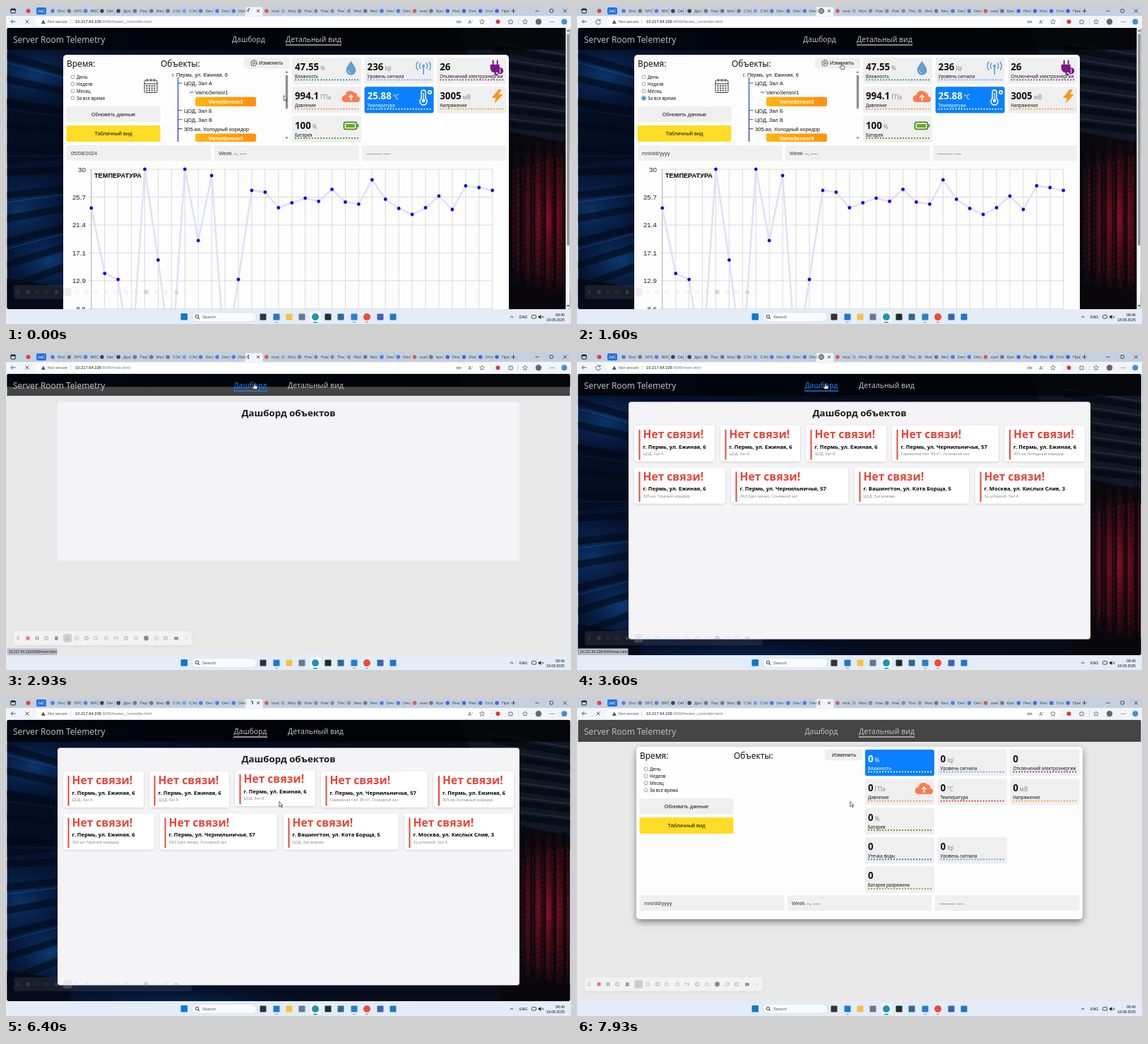
These frames come from a looping animation (800x450 px, 8000 ms). An HTML page:

```html
<!DOCTYPE html>
<html lang="ru">
<head>
<meta charset="utf-8">
<title>Server Room Telemetry</title>
<style>
html, body { margin: 0; width: 100%; height: 100%; overflow: hidden; background: #e3ecf7; }
svg { display: block; width: 100vw; height: 100vh; }
text { font-family: "Liberation Sans", Arial, sans-serif; white-space: pre; }
.n { font-family: "Noto Sans", sans-serif; }
.b { font-weight: 700; }
.mid { text-anchor: middle; }
.end { text-anchor: end; }
</style>
</head>
<body>
<svg id="stage" viewBox="0 0 800 450" xmlns="http://www.w3.org/2000/svg"></svg>
<script>
const LOOP = 8000;
const HOST = '10.217.64.226';

const text = (x, y, str, size, cls = '', fill = '#111', id = '') =>
  `<text x="${x}" y="${y}" font-size="${size}" class="${cls}" fill="${fill}" ${id && `id="${id}"`}>${str}</text>`;
const rect = (x, y, w, h, fill, r = 0, extra = '') =>
  `<rect x="${x}" y="${y}" width="${w}" height="${h}" fill="${fill}" rx="${r}" ${extra}/>`;
const disc = (x, y, r, fill, extra = '') => `<circle cx="${x}" cy="${y}" r="${r}" fill="${fill}" ${extra}/>`;
const line = (d, stroke, width = 1, extra = '') =>
  `<path d="${d}" fill="none" stroke="${stroke}" stroke-width="${width}" ${extra}/>`;
const shape = (d, fill) => `<path d="${d}" fill="${fill}"/>`;
const glow = (x, y, rx, ry, color, opacity = 1) =>
  `<ellipse cx="${x}" cy="${y}" rx="${rx}" ry="${ry}" fill="url(#${color})" opacity="${opacity}"/>`;
const group = (id, body, extra = '') => `<g id="${id}" ${extra}>${body}</g>`;
const range = (n, fn) => Array.from({ length: n }, (_, i) => fn(i)).join('');

const defs = `<defs>
  <linearGradient id="room"><stop stop-color="#051431"/><stop offset=".4" stop-color="#040c20"/>
    <stop offset=".85" stop-color="#080c17"/><stop offset="1" stop-color="#10070c"/></linearGradient>
  <radialGradient id="blueGlow"><stop stop-color="#1259a8" stop-opacity=".8"/><stop offset="1" stop-color="#0a3c86" stop-opacity="0"/></radialGradient>
  <radialGradient id="redGlow"><stop stop-color="#981226" stop-opacity=".8"/><stop offset="1" stop-color="#600a1c" stop-opacity="0"/></radialGradient>
  <linearGradient id="orange"><stop stop-color="#ffb412"/><stop offset="1" stop-color="#ff8f0c"/></linearGradient>
  <linearGradient id="tree" x2="0" y2="1"><stop stop-color="#3a6fe0"/><stop offset="1" stop-color="#6a35a8"/></linearGradient>
  <filter id="cardShadow" x="-10%" y="-20%" width="120%" height="150%"><feDropShadow dx="0" dy="1" stdDeviation="1.5" flood-opacity=".16"/></filter>
  <filter id="panelShadow" x="-5%" y="-10%" width="110%" height="125%"><feDropShadow dx="0" dy="4" stdDeviation="5" flood-opacity=".45"/></filter>
  <clipPath id="page"><rect x="1.5" y="30.5" width="797" height="398.5" rx="3"/></clipPath>
  <clipPath id="loaded"><rect id="reveal" x="0" y="30" width="800" height="400"/></clipPath>
</defs>`;

// Server room backdrop: dim blue racks on the left, red cabinets on the right
const photo = rect(0, 30, 800, 400, 'url(#room)')
  + glow(40, 98, 75, 42, 'blueGlow', .6) + glow(20, 290, 80, 60, 'blueGlow', .55)
  + glow(62, 360, 65, 45, 'blueGlow', .7) + glow(250, 438, 190, 32, 'blueGlow', .5)
  + range(11, i => line(`M0 ${70 + i * 33} L90 ${96 + i * 27}`, '#030916', 10, 'opacity=".6"'))
  + range(5, i => line(`M0 ${80 + i * 66} L90 ${104 + i * 54}`, '#2a74bd', .8, 'opacity=".55"'))
  + shape('M0 130 L90 150 V215 L0 225Z', '#030a1a99')
  + shape('M0 385 L90 400 V430 H0Z', '#040a18')
  + shape('M640 30 H800 V195 L700 175Z', '#101725')
  + range(6, i => line(`M690 ${52 + i * 21} L800 ${70 + i * 20}`, '#3d485c', 1.2, 'opacity=".6"')
    + line(`M690 ${60 + i * 21} L800 ${78 + i * 20}`, '#05080f', 9, 'opacity=".7"'))
  + shape('M705 178 L800 195 V215 L705 205Z', '#07090f')
  + glow(768, 300, 62, 120, 'redGlow')
  + range(6, i => line(`M${716 + i * 15} 190V430`, '#0b060b', 7, 'opacity=".8"'))
  + range(12, i => line(`M${718 + i * 7} ${232 - i * 2}V${372 + i * 2}`, '#c4263c', .7, 'opacity=".55" stroke-dasharray="5 2"'))
  + shape('M700 390 L800 405 V430 H700Z', '#0a070c');

const icons = {
  drop: shape('M0-9C3-4 7 0 7 4A7 7 0 0 1-7 4C-7 0-3-4 0-9Z', '#62a0ca') + line('M-4 4A4 4 0 0 0 0 8', '#b9d9ee'),
  signal: line('M0 10V-2M-4-6A6 6 0 0 0-4 2M4-6A6 6 0 0 1 4 2M-8-8A10 10 0 0 0-8 4M8-8A10 10 0 0 1 8 4', '#5b9ce0', 1.7) + disc(0, -2, 2, '#5b9ce0'),
  plug: shape('M-8-4H5V1A6 6 0 0 1-8 1Z', '#7b1685') + line('M-4-10V-4M2-10V-4M-1 6V10H3', '#7b1685', 2) + disc(6, 5, 4.5, '#7b1685') + line('M6 2V8', '#fff', 1),
  cloud: shape('M-8 8A5 5 0 0 1-8-2A7 7 0 0 1 4-6A6 6 0 0 1 9 0A4 4 0 0 1 8 8Z', '#fa7d50') + line('M0 6V-2M-3 1L0-2L3 1', '#fff', 1.7),
  thermo: line('M-3-6A3 3 0 0 1 3-6V3A5 5 0 1 1-3 3Z', '#fff', 1.5) + disc(0, 6, 2.4, '#fff') + line('M0 5V-5', '#fff', 1.3) + disc(9, -6, 2.2, 'none', 'stroke="#fff" stroke-width="1.7"'),
  bolt: shape('M4-10L-6 2H0L-2 10L10-3H4L8-10Z', '#ff9416'),
  battery: rect(-10, -5, 18, 10, 'none', 2.5, 'stroke="#4a8c14" stroke-width="1.8"') + rect(-7.5, -2.5, 13, 5, '#6aac22', 1) + rect(9, -2, 2, 4, '#4a8c14')
};

function tile(col, row, value, unit, label, color, icon = '', active = false) {
  const x = 405 + col * 102.6, y = 73 + row * 41.3, ink = active ? '#fff' : '#111';
  return rect(x, y, 98, 37.3, active ? '#0a80ff' : '#efeff0', 3)
    + `<text x="${x + 4}" y="${y + 18}" font-size="13.3" class="n b" fill="${ink}">${value}<tspan dx="2" font-size="8.2" font-weight="400" fill="${active ? '#fff' : '#888'}">${unit}</tspan></text>`
    + text(x + 4, y + 29, label, 6.2, 'n', ink)
    + line(`M${x + 5} ${y + 31.5}H${x + 94}`, active ? '#fff' : color, 2.1, 'stroke-dasharray="0 4" stroke-linecap="round"')
    + (icon && `<g transform="translate(${x + 83.5} ${y + 13.8})">${icons[icon]}</g>`);
}

const fullTiles = () =>
  tile(0, 0, '47.55', '%', 'Влажность', '#1b8296', 'drop')
  + tile(1, 0, '236', 'lqi', 'Уровень сигнала', '#6a9cf0', 'signal')
  + tile(2, 0, '26', '', 'Отключений электроэнергии', '#8b1a95', 'plug')
  + tile(0, 1, '994.1', 'ГПа', 'Давление', '#fa8a62', 'cloud')
  + tile(1, 1, '25.88', '°C', 'Температура', '#d62a1e', 'thermo', true)
  + tile(2, 1, '3005', 'мВ', 'Напряжение', '#f5a020', 'bolt')
  + tile(0, 2, '100', '%', 'Батарея', '#4a8c14', 'battery');

const emptyTiles = () =>
  tile(0, 0, '0', '%', 'Влажность', '#1b8296', '', true)
  + tile(1, 0, '0', 'lqi', 'Уровень сигнала', '#6a9cf0')
  + tile(2, 0, '0', '', 'Отключений электроэнергии', '#8b1a95')
  + tile(0, 1, '0', 'ГПа', 'Давление', '#fa8a62', 'cloud')
  + tile(1, 1, '0', '°C', 'Температура', '#d62a1e')
  + tile(2, 1, '0', 'мВ', 'Напряжение', '#f5a020')
  + tile(0, 2, '0', '%', 'Батарея', '#4a8c14')
  + tile(0, 3, '0', '', 'Утечка воды', '#2381b8')
  + tile(1, 3, '0', 'lqi', 'Уровень сигнала', '#6a9cf0')
  + tile(0, 4, '0', '', 'Батарея разряжена', '#8c9a14');

const dateRow = (y, id) => range(3, i =>
  rect(86 + i * 209, y, 204.5, 22, '#f0f0f1', 2)
  + text(92 + i * 209, y + 13.5, ['mm/dd/yyyy', 'Week --, ----', '--------- ----'][i], 7.4, '', '#333', i ? '' : id));

const controls = id =>
  text(86, 86, 'Время:', 11.9, 'n') + text(219, 86, 'Объекты:', 11.9, 'n')
  + ['День', 'Неделя', 'Месяц', 'За все время'].map((s, i) =>
      disc(94.5, 100.3 + i * 10, 2.5, '#fff', 'stroke="#777" stroke-width=".7"') + text(100, 102.7 + i * 10, s, 6.3, 'n')).join('')
  + group(id, disc(94.5, 130.3, 2.7, '#fff', 'stroke="#0a6fe0"') + disc(94.5, 130.3, 1.5, '#0a6fe0'), 'visibility="hidden"')
  + rect(85.5, 142, 133, 22.5, '#efeff0', 2) + text(152, 155.8, 'Обновить данные', 7.5, 'mid')
  + rect(85.5, 169, 133, 23, '#ffdc26', 2) + text(152, 183, 'Табличный вид', 7.5, 'mid');

function objectTree() {
  const rows = [[252, 'ЦОД, Зал А', 112], [268, 'VarnoSensor1', 125], [252, 'ЦОД, Зал Б', 150.5], [252, 'ЦОД, Зал В', 163.5], [252, '305-ая, Холодный коридор', 176.5]];
  return text(235, 99.5, 'г. Пермь, ул. Ежиная, 6', 7.4)
    + rect(242.8, 101, 1.5, 91, 'url(#tree)')
    + rows.map(([x, s, y]) => text(x, y, s, 7.4) + line(`M${x - 8} ${y - 2.8}h5.5`, y > 170 ? '#6a40b8' : '#3a80e0', 1.3)).join('')
    + [[128.7, 13.3, 2], [180.6, 11.4, 9]].map(([y, h, n]) =>
        rect(268, y, 86, h, 'url(#orange)', 2.5) + text(311, y + 9.2, 'VarnoSensor' + n, 7.3, 'b mid', '#fff')).join('')
    + rect(395.8, 97.5, 3.4, 48, '#909090', 1.7) + shape('M395.5 94.5l2-2.5 2 2.5z', '#666') + shape('M395.5 185.5l2 2.5 2-2.5z', '#666');
}

function chart() {
  // Temperatures as heights on the page; 507 is the zero line below the fold
  const ys = [286, 378.5, 387, 507, 231, 359.5, 507, 231, 332, 240, 507, 387, 261, 263.5, 285.5, 278.5, 272, 276.5, 259.5, 277.5, 280.5,
    246, 273.5, 286.5, 295, 285.5, 269, 288, 254.5, 257, 261];
  const px = i => 120.8 + i * 18.93;
  return range(31, i => line(`M${px(i)} 231V430`, '#d2d2d4', .8))
    + ['30', '25.7', '21.4', '17.1', '12.9', '8.6'].map((s, i) =>
        line(`M117 ${231 + i * 39.45}H689`, '#d2d2d4', .8) + text(113, 234.5 + i * 39.45, s, 9.8, 'end', '#222')).join('')
    + line('M120.8 231V430', '#aaa', .8)
    + line('M' + ys.map((y, i) => px(i) + ' ' + y).join('L'), '#e0e0f6', 2.5)
    + ys.map((y, i) => disc(px(i), y, 2.4, '#0808e8')).join('')
    + text(125, 243, 'ТЕМПЕРАТУРА', 9.2, 'b', '#000');
}

const NAV = [190, 190, 190], LINK = [26, 136, 255];
const navColor = `rgb(${NAV})`;
const header = shift => rect(0, 30, 800, 32, '#000', 0, 'opacity=".7"')
  + text(10, 51.5, 'Server Room Telemetry', 11.9, 'n', navColor)
  + text(396 + shift, 50.5, 'Детальный вид', 10.4, 'n', navColor);
const homeLink = (x, id) => text(x, 50.5, 'Дашборд', 10.3, 'n', navColor, id);

const fullDetail = header(0) + homeLink(320, 'linkA') + rect(320, 54.5, 47, 1.2, '#1a88ff', 0, 'id="underA"')
  + rect(396, 54.5, 79, 1.2, '#d8d8d8')
  + rect(81, 69, 631, 370, '#fdfdfd', 5) + controls('allTime')
  + rect(196, 105, 18, 17.5, 'none', 2, 'stroke="#333" stroke-width="1"') + line('M196 110H214M200 103V107M205 103V107M210 103V107', '#333', 1)
  + range(12, i => rect(198.5 + i % 4 * 3.6, 112 + Math.floor(i / 4) * 3.3, 2, 2, '#444'))
  + rect(337, 73, 64, 15.5, '#efeff0', 3) + disc(351, 80.8, 4, 'none', 'stroke="#333" stroke-width="1.1" stroke-dasharray="2.2 .7"') + disc(351, 80.8, 1.5, 'none', 'stroke="#333" stroke-width=".8"')
  + text(358, 83.3, 'Изменить', 7.6)
  + objectTree() + fullTiles() + dateRow(197, 'dateField') + chart()
  + rect(792.5, 30, 7, 400, '#f4f4f5') + rect(794.4, 39, 3, 300, '#8b8b8d', 1.5) + shape('M793.8 36l2.1-3 2.1 3z', '#555') + shape('M793.8 423l2.1 3 2.1-3z', '#555');

const emptyDetail = header(3) + homeLink(322.5, 'linkC') + rect(399, 54.5, 79, 1.2, '#e2e2e2')
  + rect(84, 69, 632, 244, '#fdfdfd', 5, 'filter="url(#panelShadow)"')
  + '<g transform="translate(3 0)">' + controls('allTimeOff')
  + rect(348, 73, 53, 15.5, '#efeff0', 3) + text(358, 83.3, 'Изменить', 7.6)
  + emptyTiles() + dateRow(279, '') + '</g>';

const PERM = 'г. Пермь, ул. Ежиная, 6', PLANT = 'г. Пермь, ул. Чернильничья, 57';
const cards = [
  [81, 104, 114, PERM, 'ЦОД, Зал А'], [203, 104, 113, PERM, 'ЦОД, Зал Б'], [324, 104, 114, PERM, 'ЦОД, Зал В'],
  [446, 104, 151, PLANT, 'Серверная тип. 85-01, Основной зал'], [605.5, 104, 113.5, PERM, '305-ая, Холодный коридор'],
  [81, 163.5, 129, PERM, '305-ая, Горячий коридор'], [218, 163.5, 166, PLANT, 'ЛАЗ (Цех связи), Основной зал'],
  [393, 163.5, 162, 'г. Вашингтон, ул. Кота Борща, 5', 'ЦОД, Зал вовово'], [564, 163.5, 155, 'г. Москва, ул. Кислых Слив, 3', 'За шторкой, Зал А']
].map(([x, y, w, address, place], i) => group('card' + i,
  rect(x, y, w, 51, '#fff', 4, 'filter="url(#cardShadow)"') + rect(x + 6.5, y + 6, 2, 42.5, '#e8483c')
  + text(x + 12.5, y + 18, 'Нет связи!', 15.6, 'n b', '#ea4335')
  + text(x + 12.5, y + 32.5, address, 7.55, 'n b', '#000') + text(x + 12.5, y + 42, place, 5.45, 'n', '#888'))).join('');

const dashboard = header(3) + homeLink(322.5, 'linkB') + rect(322, 54.5, 48, 1.3, '#ddd', 0, 'id="underB"')
  + rect(73, 70.5, 654, 336, '#f4f3f6', 4, 'id="board"')
  + text(400, 91.3, 'Дашборд объектов', 13.2, 'n b mid', '#1b1b1b') + group('cards', cards);

const recorder = rect(11, 395, 252, 20, '#fff', 4, 'id="recorderBar" filter="url(#cardShadow)"')
  + group('recorderIcons', rect(81, 399, 12, 12, '#ccc', 2) + rect(28.5, 402.5, 5, 5, '#e86060')
    + line('M42.5 402.5v5M45.5 402.5v5', '#777', 1.4) + rect(69, 402.5, 4.5, 5.5, '#888', 1)
    + [57, 87, 100, 114, 127, 142, 170, 184, 213, 226].map((x, i) => disc(x, 405, 2.4, 'none', `stroke="${i % 3 ? '#aaa' : '#888'}" stroke-width=".9"`)).join('')
    + text(152, 407.5, 'Tт', 6.5, '', '#888') + disc(198.5, 405, 3.4, '#777') + rect(238, 403, 6, 4.5, '#888', 1)
    + line('M256.5 403l-2 2 2 2M16 402v6M18 402v6', '#aaa', .8));

const tabNames = 'Sho SPC BRC Del Дро Пер Мес СЭл СЭл Dev Dev Dev . mos Mos Нов Нов The Mos Nev Dev Dev user Кри Реа Res Отл При'.split(' ');
const tabColors = '#5a7bd8 #777 #5a7bd8 #444 #444 #777 #777 #777 #7aa0d8 #5578e8 #5578e8 #5578e8 . #d85a4a #aaa #88a #88a #88a #999 #777 #5578e8 #5578e8 #d85a4a #777 #4466e8 #4466e8 #4466e8 #4466e8'.split(' ');
const globe = disc(346, 7, 3.5, 'none', 'stroke="#333" stroke-width=".9"') + line('M342.5 7h7M346 3.5v7M346 3.5a4 4 0 0 0 0 7a4 4 0 0 0 0-7', '#333', .6);

const browser = rect(0, 0, 800, 15, '#c5d0de') + rect(0, 14, 800, 17, '#f1f4f9')
  + rect(6.8, 4, 6.5, 6, 'none', 1, 'stroke="#222" stroke-width="1"') + rect(6.8, 4, 6.5, 2, '#222') + disc(31.5, 7, 3, '#e04038')
  + rect(43, 2, 14, 10, '#2670e0', 2) + text(50, 9.2, 'JaC', 5.8, 'mid', '#fff')
  + shape('M336 15Q338.5 15 338.5 12V4Q338.5 1.5 341 1.5H361Q363.5 1.5 363.5 4V12Q363.5 15 366 15Z', '#f1f4f9')
  + tabNames.map((s, i) => {
      const x = 66 + i * 23.3;
      return i === 12 ? '' : disc(x, 7, 2.8, tabColors[i]) + text(x + 6.8, 9.2, s, 5.7, '', '#444') + rect(x + 17.5, 3.5, .6, 7, '#9aa5b3');
    }).join('')
  + line('M355 5l4 4M359 5l-4 4M718.5 4v6M715.5 7h6M749.5 7h5M789 4.5l5 5M794 4.5l-5 5', '#222', .8)
  + rect(770, 4.5, 4.5, 4.5, 'none', 1, 'stroke="#222" stroke-width=".8"')
  + line('M13.5 22H7M9.5 19.5L7 22l2.5 2.5', '#444', .9)
  + rect(42, 16, 643, 12.8, '#fff', 6.4)
  + shape('M49.8 25l3-5.5 3 5.5z', '#555') + text(59, 24.4, 'Not secure', 5.8, '', '#555') + rect(91.5, 18.5, .6, 7, '#bbb')
  + `<text x="98" y="24.4" font-size="5.75" fill="#111">${HOST}<tspan id="path" fill="#777"></tspan></text>`
  + group('glasses', line('M638 22.5a1.3 1.3 0 1 0 2.6 0a1.3 1.3 0 1 0-2.6 0M641.4 22.5a1.3 1.3 0 1 0 2.6 0a1.3 1.3 0 1 0-2.6 0', '#555', .8))
  + text(654.5, 24.8, 'A', 6.5, '', '#444') + text(659, 22, '»', 4, '', '#444')
  + [674, 735].map(x => line(`M${x} 18.8l1 2.2 2.4.3-1.8 1.6.5 2.5-2.1-1.3-2.1 1.3.5-2.5-1.8-1.6 2.4-.3z`, '#555', .7)).join('')
  + disc(696.5, 22.3, 3, '#d83a3a') + rect(712, 20, 5, 5, 'none', 1, 'stroke="#555" stroke-width=".9"')
  + rect(725, 18, .6, 8, '#c5c9d0') + disc(754, 22.3, 4.2, '#6b6470')
  + range(3, i => disc(771 + i * 2.2, 22.3, .6, '#333')) + disc(790.5, 22.3, 4, '#3f8fd8')
  + group('idle', globe + line('M32.6 20.4A3.3 3.3 0 1 0 33.3 23M33 18.6v2.2h-2.2', '#444', .9))
  + group('busy', line('M27.5 19.5l5 5M32.5 19.5l-5 5', '#444', .9)
    + disc(346, 6.8, 3.3, 'none', 'id="spinner" stroke="#333" stroke-width="1.2" stroke-dasharray="6 14.7"'));

const taskIcons = [[364, '#333'], [383, '#1f78d0'], [401, '#f5c242'], [419, '#68788c'], [438, '#1c93b8', 1], [456, '#1c3028'],
  [474, '#336791'], [493, '#2680cc'], [511, '#f04a38', 1], [530, '#3f62b8'], [548, '#2078c8']];
const taskbar = rect(0, 429, 800, 21, '#e3ecf7') + rect(247.5, 435, 9.5, 9.5, '#0f78d4', 1)
  + rect(263.5, 433.5, 91, 13, '#f8fafd', 6.5, 'stroke="#d0d8e4" stroke-width=".5"')
  + disc(270.5, 439.3, 2.2, 'none', 'stroke="#333"') + line('M272 441l2 2', '#333') + text(278, 442.2, 'Search', 6, '', '#555')
  + rect(430.5, 432, 15, 15.5, '#f5f9fd', 2)
  + taskIcons.map(([x, c, round]) => round ? disc(x, 440, 5, c) : rect(x - 4.5, 435.5, 9, 9, c, 1)).join('')
  + rect(435, 447, 6, 1.2, '#1470cc', .6) + range(3, i => rect([381, 491, 509][i], 447, 4, 1, '#8892a0', .5))
  + line('M714 441l2.2-2.2 2.2 2.2', '#222', .9) + text(727, 442, 'ENG', 5.3)
  + rect(744.5, 437.5, 6, 4.5, 'none', 1, 'stroke="#222" stroke-width=".8"') + shape('M754 438.7h1.5l2-1.7v6l-2-1.7H754z', '#222') + line('M758.5 438.5l3 3M761.5 438.5l-3 3', '#222', .6)
  + text(791, 438.5, '08:40', 5.2, 'end') + text(791, 445.5, '18.08.2025', 5.2, 'end');

const pointers = group('arrow', '<path d="M0 0V7.2L1.8 5.7L3 8.3L4.2 7.8L3 5.2H5.3Z" fill="#fff" stroke="#222" stroke-width=".7"/>')
  + group('hand', '<path d="M-.8-3.5Q0-4.3.8-3.5V-.5L3.5.2Q4.2.5 4 1.6L3.4 4.5H-1.2L-3.2 1.4Q-3-.1-.8 1.4Z" fill="#fff" stroke="#222" stroke-width=".7"/>')
  + group('beam', line('M-1.5-3.5H1.5M0-3.5V3.5M-1.5 3.5H1.5', '#333', .8));

document.getElementById('stage').innerHTML = defs + rect(0, 0, 800, 450, '#e3ecf7')
  + `<g clip-path="url(#page)">${rect(0, 30, 800, 400, '#e9e8e8')}<g clip-path="url(#loaded)">${photo}</g>`
  + group('detail', fullDetail) + group('dash', dashboard) + group('skeleton', emptyDetail) + recorder
  + group('hint', rect(1, 419.5, 71.5, 10, '#b9bcc2', 1) + text(4, 426, HOST + ':9090/main.html', 5, '', '#222')) + '</g>'
  + browser + taskbar + group('cursor', pointers);

const el = Object.fromEntries([...document.querySelectorAll('[id]')].map(e => [e.id, e]));
const show = (id, on) => el[id].setAttribute('visibility', on ? 'visible' : 'hidden');
const set = (id, name, value) => el[id].setAttribute(name, value);
const ramp = (t, a, b) => Math.min(1, Math.max(0, (t - a) / (b - a)));
const ease = p => p * p * (3 - 2 * p);
const mix = (a, b, p) => `rgb(${a.map((v, i) => Math.round(v + (b[i] - v) * p))})`;
const display = (id, on) => el[id].style.display = on ? '' : 'none';

const track = [[0, 393, 126.5], [870, 393, 126.5], [1600, 375, 85], [1800, 375, 85], [2300, 352, 48], [5000, 352, 48], [5200, 377, 91], [5670, 386.8, 146.5], [LOOP, 386.8, 146.5]];
function pointerAt(t) {
  const k = track.findIndex(p => p[0] > t), [t0, x0, y0] = track[k - 1], [t1, x1, y1] = track[k];
  const p = ease(ramp(t, t0, t1));
  return [x0 + (x1 - x0) * p, y0 + (y1 - y0) * p];
}

const DASH_AT = 2730, DETAIL_AT = 6800;
function draw(t) {
  const onDash = t >= DASH_AT && t < DETAIL_AT, ready = t >= 3200;
  const busy = t < 470 || (t >= 2600 && t < 3270) || t >= 6330;
  display('detail', t < DASH_AT);
  display('dash', onDash);
  display('skeleton', t >= DETAIL_AT);
  display('cards', ready);
  set('board', 'height', ready ? 336 : 225);
  show('idle', !busy);
  show('busy', busy);
  show('glasses', t < 6330 || t >= DETAIL_AT);
  set('spinner', 'transform', `rotate(${150 + t * .36} 346 6.8)`);
  el.path.textContent = ':9090/' + (t >= 2600 && t < 6330 ? 'main' : 'heater_controller') + '.html';

  const shown = t < DASH_AT ? 1 : t < DETAIL_AT ? ramp(t, 2800, 3270) ** 2.37 : 0;
  set('reveal', 'height', 400 * shown);
  set('recorderBar', 'opacity', shown > .8 ? .08 : .45);
  set('recorderIcons', 'opacity', shown > .8 ? .25 : .85);

  show('allTime', t >= 470);
  el.dateField.textContent = t < 470 ? '05/08/2024' : 'mm/dd/yyyy';

  const entered = ramp(t, 2130, 2300);
  const linkColor = mix(NAV, LINK, entered * (1 - ramp(t, 5050, 5200)));
  const underline = entered * (1 - ramp(t, 5080, 5330));
  set('linkA', 'fill', linkColor);
  set('linkB', 'fill', linkColor);
  set('underA', 'opacity', underline);
  set('underB', 'fill', mix([221, 221, 221], LINK, underline));
  show('hint', t >= 2200 && t < 5400);
  set('card2', 'transform', `translate(0 ${-2 * ease(ramp(t, 5330, 5530))})`);

  const [x, y] = pointerAt(t);
  const hand = y < 56 || (t < DASH_AT && y > 73 && y < 88.5);
  const beam = onDash && y > 80 && y < 96;
  set('cursor', 'transform', `translate(${x} ${y})`);
  show('hand', hand);
  show('beam', beam);
  show('arrow', !hand && !beam);
}

function tick() {
  draw(performance.now() % LOOP);
  requestAnimationFrame(tick);
}
tick();
</script>
</body>
</html>
```
